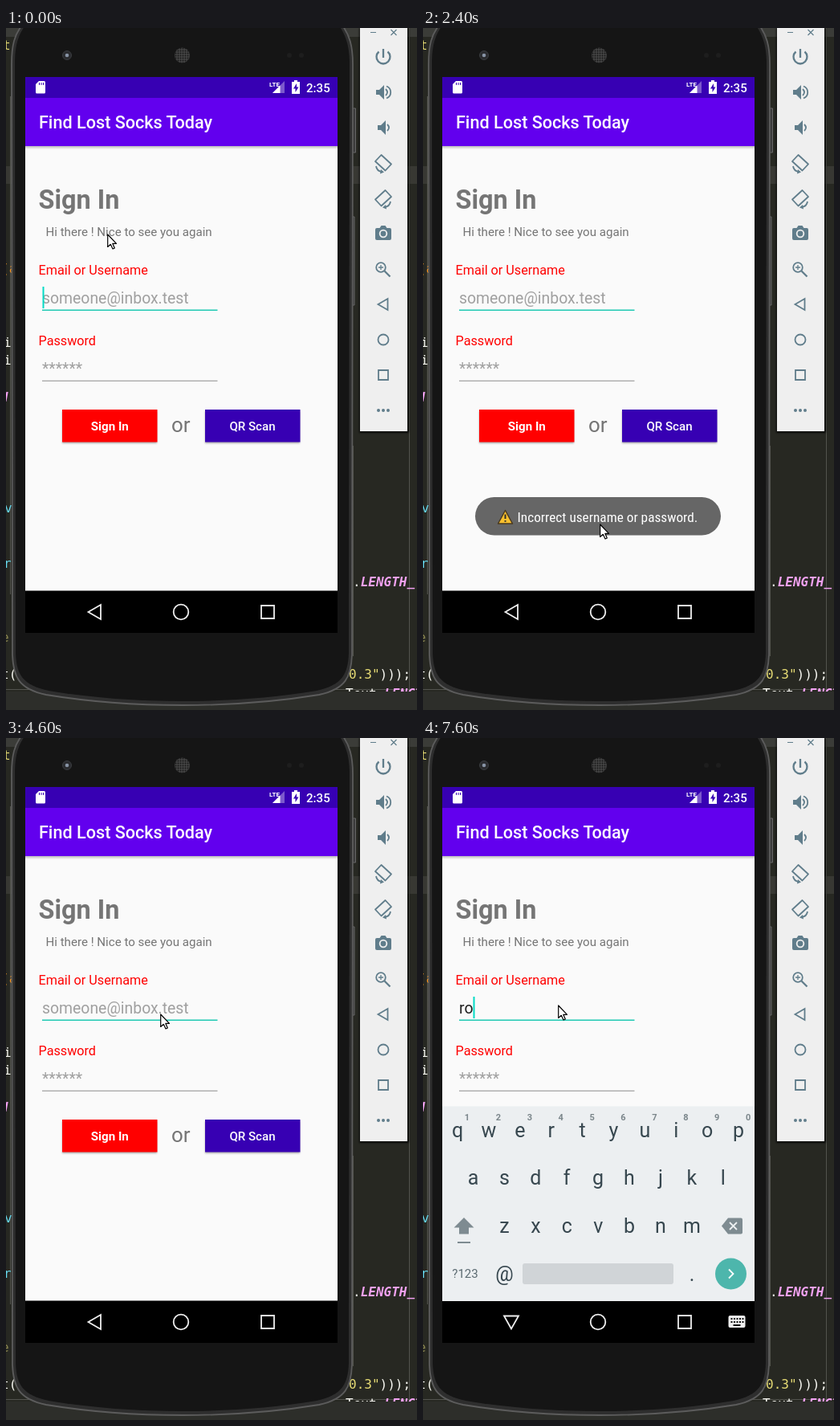
An HTML page that plays this animation: 512 px wide and 849 px high, repeating every 8000 ms.

```html
<!DOCTYPE html>
<html lang="en">
<head>
<meta charset="utf-8">
<title>Sign in</title>
<style>
  html, body { margin: 0; width: 100%; height: 100%; overflow: hidden; background: #272822; }
  svg { display: block; width: 512px; height: 849px; font-family: Roboto, sans-serif; }
  .code { font: 16px "DejaVu Sans Mono", monospace; }
  .const { font-weight: 700; font-style: italic; fill: #f3a2f3; }
  .mid { text-anchor: middle; }
  .line { fill: none; stroke-width: 1.8; }
  .label { font-size: 16.2px; fill: #f00; }
  .input { font-size: 19.4px; fill: #a0a0a0; }
  .button { font-size: 15.1px; fill: #fff; text-anchor: middle; }
  .key { font-size: 25px; fill: #37474f; text-anchor: middle; }
  .digit { font-size: 11px; font-weight: 700; fill: #7b868b; text-anchor: middle; }
  #toast text { font-family: "Roboto Condensed", Roboto, sans-serif; font-stretch: 75%; font-size: 17.3px; fill: #fff; }
</style>
</head>
<body>
<svg viewBox="0 0 512 849">
  <defs>
    <linearGradient id="fade" x2="0" y2="1">
      <stop stop-color="#000" stop-opacity=".25"/><stop offset="1" stop-color="#000" stop-opacity="0"/>
    </linearGradient>
    <pattern id="mesh" width="3" height="3" patternUnits="userSpaceOnUse">
      <rect width="3" height="3" fill="#444"/><circle cx="1.5" cy="1.5" r="1" fill="#191919"/>
    </pattern>
    <filter id="soft" x="-20%" y="-20%" width="140%" height="150%"><feGaussianBlur stdDeviation="1.2"/></filter>
    <clipPath id="editor"><path d="M0 0H512V826H0z"/></clipPath>
  </defs>

  <!-- code editor behind the emulator -->
  <path fill="#272822" d="M0 0H512V849H0z"/>
  <path fill="#3b3c38" d="M0 0H512V11H0z"/>
  <path fill="#383833" d="M0 172H512V194H0z"/>
  <path fill="#2d2e2a" d="M0 826H512V849H0z"/>
  <path stroke="#53544e" fill="none" d="M502.500 0V823M432.500 520V782M0 823.500H512M5.500 85V705"/>
  <g class="code" clip-path="url(#editor)" fill="#f8f8f2">
    <text x="-4" y="27" fill="#e6db74">t</text>
    <text x="-6" y="305" fill="#fd971f">(a</text>
    <text x="-3" y="397">i</text>
    <text x="-3" y="419">i</text>
    <text x="-7" y="465" class="const">H</text>
    <text x="-2" y="603" fill="#66d9ef">v</text>
    <text x="-3" y="672" fill="#66d9ef">rm</text>
    <text x="-6" y="764" fill="#8f8a52">e</text>
    <text x="-6" y="810">t(r</text>
    <text x="432" y="695">.<tspan class="const">LENGTH_</tspan></text>
    <text x="427" y="810"><tspan fill="#e6db74">0.3"</tspan>)));</text>
    <text x="423" y="834">Text.<tspan class="const">LENGTH_</tspan></text>
  </g>

  <!-- emulator tool bar -->
  <path fill="#000" opacity=".7" filter="url(#soft)" d="M440 0H502V504H440z"/>
  <path fill="#efefef" d="M441 0H500V502H441z"/>
  <g class="line" stroke="#607d8b">
    <path d="M454 5.500h7M479.500 2l7 7M486.500 2l-7 7" stroke-width="1.2"/>
    <path stroke-width="2.3" d="M470 26v11M464.500 29.500a8.500 8.500 0 1 0 11 0"/>
    <g id="speaker"><path fill="#607d8b" stroke="none" d="M461 77h4l6 -6v18l-6 -6h-4z"/><path d="M473 76q4 4 0 8"/></g>
    <path d="M474 72.500a8 8 0 0 1 0 15"/>
    <use href="#speaker" x="2" y="44"/>
    <g id="rotate" stroke-linejoin="round">
      <path d="M467.500 158l12.500 11.500 -7.500 8 -12.500 -11.500zM461 172q1 6 7 7"/>
      <path fill="#607d8b" stroke="none" d="M467 176l4 3.500 -5 2z"/>
    </g>
    <use href="#rotate" transform="matrix(-1 0 0 1 940 44)"/>
    <path fill="#607d8b" stroke="none" d="M462 249h3.500l2 -3h5l2 3h3.500q2 0 2 2v11q0 2 -2 2h-16q-2 0 -2 -2v-11q0 -2 2 -2z"/>
    <circle cx="470" cy="256" r="4.300" stroke="#efefef"/>
    <path d="M471.500 302.500l7 7" stroke-width="2.300"/>
    <circle cx="467" cy="298" r="5.800"/><path d="M464 298h6M467 295v6" stroke-width="1.300"/>
    <path d="M463.500 344l12 -7v14z"/><circle cx="470" cy="388" r="6.500"/><path d="M464 426h12v12h-12z"/>
    <path d="M464 476h0M470 476h0M476 476h0" stroke-width="4" stroke-linecap="round"/>
  </g>

  <!-- phone body: rim, then face -->
  <path fill="#3b3b3b" stroke="#666" d="M431 100h4.500v55H431zM431 235h3v110h-3z"/>
  <path fill="#2e2e2e" stroke="#5c5c5c" stroke-width="1.800" d="M22 -6C10 8 7 22 7 45L8 780C9 808 16 823 50 830C105 839 165 843 220 843S335 839 390 830C423 823 430 808 431 780L432 45C432 22 428 8 417 -6z"/>
  <path fill="#151515" d="M26 -6C14 9 11 24 11 45L12 778C13 804 20 818 53 825C107 834 165 838 220 838S333 834 387 825C419 818 426 804 427 778L428 45C428 24 424 9 413 -6z"/>
  <circle cx="76" cy="34" r="5.500" fill="#2a2b2e" stroke="#3a3c40"/><circle cx="76" cy="34" r="2.300" fill="#8793a5"/>
  <circle cx="219.500" cy="34" r="9.500" fill="url(#mesh)"/>
  <circle cx="353" cy="34" r="3" fill="#1e1e1e"/><circle cx="368" cy="34" r="3" fill="#1e1e1e"/>

  <!-- app screen -->
  <path fill="#fafafa" d="M24 61H413V702H24z"/>
  <path fill="url(#fade)" d="M24 147H413V151H24z"/>
  <path fill="#6200ee" d="M24 86H413V147H24z"/>
  <path fill="#3700b3" d="M24 61H413V87H24z"/>
  <g fill="#fff">
    <path d="M41 66h6.500q1.500 0 1.500 1.500V80q0 1.500 -1.500 1.500h-9q-1.500 0 -1.500 -1.500V70z"/>
    <path stroke="#3700b3" d="M41.500 68v3M44 68v3M46.500 68v3"/>
    <text x="328" y="73" font-size="8" font-weight="700">LTE</text>
    <path opacity=".35" d="M347 66V81H332z"/><path d="M341.500 71.500V81H332z"/>
    <path d="M359 65h4v2h3v15h-10V67h3z"/><path fill="#3700b3" d="M362 69l-4 6.500h2.500V80l4 -6.500H362z"/>
    <text x="374" y="79.500" font-size="15.1" font-weight="500">2:35</text>
    <text x="41" y="125" font-size="21.6" font-weight="500">Find Lost Socks Today</text>
  </g>
  <g fill="#757575">
    <text x="40.500" y="225" font-size="32.4" font-weight="700">Sign In</text>
    <text x="49.500" y="259" font-size="15.1">Hi there ! Nice to see you again</text>
    <text x="206" y="503" font-size="25.9">or</text>
  </g>
  <text class="label" x="40.500" y="306.500">Email or Username</text>
  <text class="label" x="40.500" y="395">Password</text>
  <text class="input" id="email" x="45" y="343"></text>
  <text class="input" x="45" y="431">******</text>
  <path fill="#1fc9b3" d="M45 350.400H263.500V351.900H45z"/>
  <path fill="#8c8c8c" d="M45 438.700H263.500V439.800H45z"/>
  <path id="caret" fill="#03dac5" d="M45.500 322h2v27h-2z"/>
  <path fill="#000" opacity=".32" filter="url(#soft)" d="M70 477H188V517H70zM248 477H366V517H248z"/>
  <path fill="#f00" d="M70 475H188.500V515.500H70z"/>
  <path fill="#3700b3" d="M248 475H366.500V515.500H248z"/>
  <circle id="ripple" cx="128" cy="495" r="20" fill="#000" opacity=".12"/>
  <text class="button" x="129.300" y="501" font-weight="700">Sign In</text>
  <text class="button" x="307" y="501" font-weight="500">QR Scan</text>

  <g id="toast">
    <rect x="65" y="584" width="306" height="47.500" rx="23.700" fill="#666"/>
    <path d="M102.500 600.500l9 16.500h-18z" fill="#fbc02d" stroke="#4a3a20" stroke-width="1.500" stroke-linejoin="round"/>
    <path d="M102.500 605.500v5.500M102.500 613v1.800" stroke="#2d2d2d" stroke-width="2"/>
    <text id="message" x="117.500" y="614.500">Incorrect username or password.</text>
  </g>

  <path d="M24 700.500H413V753H24z"/>
  <g id="keyboard">
    <path fill="#eceff1" d="M24 458.500H413V701H24z"/>
    <g id="keys"></g>
    <path fill="#7e8b91" d="M51 597l12.500 12.500h-6.500v8h-12v-8h-6.500zM43 627h16v2h-16z"/>
    <path fill="#7e8b91" d="M380 597.500h16q2 0 2 2v16q0 2 -2 2h-16l-8 -10z"/>
    <path class="line" stroke="#eceff1" d="M382 603l9 9M391 603l-9 9"/>
    <text class="mid" x="52.500" y="672" font-size="15" fill="#5b6a71">?123</text>
    <rect x="124" y="654" width="188" height="26" rx="3" fill="#d0d4d7"/>
    <circle cx="383.500" cy="667" r="19.500" fill="#4db6ac"/>
    <path class="line" stroke="#fff" stroke-width="2" d="M381 661.500l5.500 5.500 -5.500 5.500"/>
  </g>
  <g class="line" stroke="#efefef" stroke-width="2">
    <path id="back" d="M102.500 727l15.500 -9v18z"/>
    <path id="hide" d="M110 735.500l-9 -16h18z"/>
    <circle cx="218" cy="727" r="9.300"/>
    <path d="M318 719h16v16h-16z"/>
    <g id="switcher" stroke="none">
      <rect x="380.500" y="719" width="21" height="15" rx="2" fill="#efefef"/>
      <path stroke="#111" stroke-width="2" stroke-dasharray="2 1.500" d="M383.500 723h16M383.500 727h16"/>
      <path stroke="#111" stroke-width="2" d="M386.500 731h9"/>
    </g>
  </g>

  <path id="pointer" fill="#fff" stroke="#000" stroke-width="1.200" stroke-linejoin="round" d="M.7 1V16.500L4.300 13.300L7 19L9.300 18L6.800 12.300H11.500z"/>
</svg>
<script>
const LOOP = 8000, STEP = 100;
const $ = id => document.getElementById(id);
const clamp = v => Math.max(0, Math.min(1, v));
const show = (id, on) => $(id).setAttribute('visibility', on ? 'visible' : 'hidden');

// time, x, y of the mouse pointer
const path = [
  [0, 126, 256], [300, 126, 290], [700, 126, 440], [900, 126, 489], [1000, 126, 500],
  [1700, 126, 500], [2000, 160, 562], [2300, 207, 617], [2400, 220, 617],
  [2700, 220, 617], [3200, 336, 620], [3300, 336, 620], [3900, 329, 547],
  [4200, 259, 388], [4600, 192, 343], [4800, 168, 332], [LOOP, 168, 332]
];
// moments at which the text caret flips, starting from visible
const blinks = [100, 600, 1100, 1600, 2200, 2800, 3200, 3700, 4300, 4700,
                5200, 5700, 6200, 6700, 7200, 7500];

function pointerAt(t) {
  const i = path.findIndex(p => p[0] > t);
  const [t0, x0, y0] = path[i - 1], [t1, x1, y1] = path[i];
  const k = (t - t0) / (t1 - t0);
  return [x0 + (x1 - x0) * k, y0 + (y1 - y0) * k].map(Math.round);
}

function addKey(char, x, y, cls = 'key') {
  const el = document.createElementNS('http://www.w3.org/2000/svg', 'text');
  el.setAttribute('class', cls);
  el.setAttribute('x', x);
  el.setAttribute('y', y);
  el.textContent = char;
  $('keys').append(el);
}
const addRow = (chars, x, y, cls) => [...chars].forEach((c, i) => addKey(c, x + i * 38.9, y, cls));
addRow('qwertyuiop', 43, 497);
addRow('1234567890', 55, 476, 'digit');
addRow('asdfghjkl', 62.5, 556);
addRow('zxcvbnm', 101.5, 615.5);
addKey('@', 101.5, 675.5);
addKey('.', 335, 675.5);

// keep the message inside the pill when no condensed face exists
if ($('message').getComputedTextLength() > 240) $('message').style.fontSize = '15.3px';

function draw(t) {
  const typed = t >= 7600 ? 'ro' : t >= 7500 ? 'r' : '';
  $('email').textContent = typed || 'someone@inbox.test';
  $('email').style.fill = typed ? '#212121' : '';
  $('caret').setAttribute('transform', `translate(${[0, 6, 17][typed.length]})`);
  show('caret', blinks.filter(b => b <= t).length % 2 === 0);

  $('pointer').setAttribute('transform', `translate(${pointerAt(t)})`);
  show('ripple', t >= 1000 && t < 1100);
  $('toast').setAttribute('opacity', Math.min(clamp((t - 1440) / 540), clamp((4200 - t) / 460)));

  const open = t >= 6100, rise = clamp((t - 6100) / 200);
  show('keyboard', open);
  show('hide', open);
  show('switcher', open);
  show('back', !open);
  $('keyboard').setAttribute('opacity', 0.62 + 0.38 * rise);
  $('keyboard').setAttribute('transform', `translate(0 ${Math.round(42.5 * (1 - rise) ** 1.6)})`);
}

let start;
function tick(now) {
  start ??= now;
  draw(Math.floor((now - start) % LOOP / STEP) * STEP);
  requestAnimationFrame(tick);
}
draw(0);
requestAnimationFrame(tick);
</script>
</body>
</html>
```
